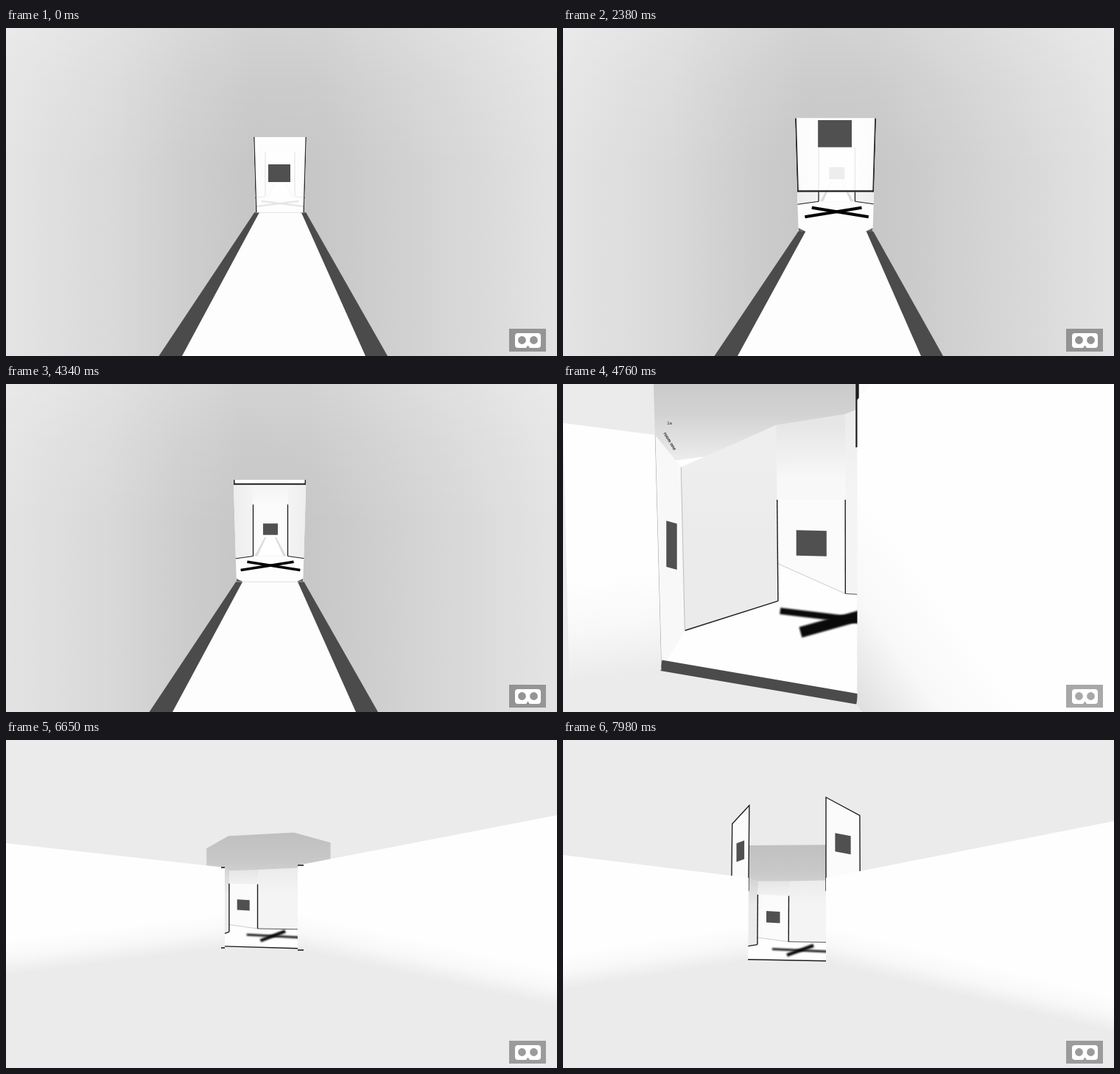
An HTML page with a canvas for the animation above (8 s loop, 748 px wide and 445 px high).

```html
<!DOCTYPE html>
<html lang="en">
<head>
<meta charset="utf-8">
<title>Rooms</title>
<style>
  html, body { margin: 0; width: 100%; height: 100%; overflow: hidden; background: #ebebeb; }
  canvas { display: block; }
</style>
</head>
<body>
<canvas id="stage" width="748" height="445"></canvas>
<script>
const W = 748, H = 445, LOOP = 8000, STEP = 70;
const HORIZON = 198, DROP = H - HORIZON;
const EXIT = 4690; // moment the camera passes through the corridor wall
const g = document.getElementById('stage').getContext('2d');
const DARK = '#4b4b4b', MARK = '#505050', INK = '#1c1c1c';

// ---------- helpers ----------
const lerp = (a, b, p) => a + (b - a) * p;
const clamp = v => Math.max(0, Math.min(1, v));
const grey = v => `rgb(${v},${v},${v})`;

// straight moves between [time, value] keys
function track(keys, t) {
  const i = keys.findIndex(k => t <= k[0]);
  if (i < 0) return keys[keys.length - 1][1];
  if (!i) return keys[0][1];
  const [t0, a] = keys[i - 1], [t1, b] = keys[i];
  return lerp(a, b, (t - t0) / (t1 - t0));
}

function trace(points) {
  g.beginPath();
  points.flat().forEach((v, i, all) => i % 2 && g.lineTo(all[i - 1], v));
  g.closePath();
}

function poly(points, fill) {
  trace(points);
  g.fillStyle = fill;
  g.fill();
}

function line([x1, y1], [x2, y2], w = 1, color = INK) {
  g.beginPath();
  g.moveTo(x1, y1);
  g.lineTo(x2, y2);
  g.lineWidth = w;
  g.strokeStyle = color;
  g.stroke();
}

function ramp(x1, y1, x2, y2, ...stops) {
  const r = g.createLinearGradient(x1, y1, x2, y2);
  stops.forEach(([at, c]) => r.addColorStop(at, c));
  return r;
}

function soft(px, draw) {
  g.save();
  g.filter = `blur(${px}px)`;
  draw();
  g.restore();
}

function mark([x, y], w, h, skew = 0) {
  const a = w / 2, b = h / 2;
  soft(.7, () => poly([x - a, y - b - skew, x + a, y - b + skew, x + a, y + b + skew, x - a, y + b - skew], MARK));
}

// ---------- corridor ----------
const DIST = [[420, 1], [1190, .29], [1260, .305], [1330, .48], [1890, 1], [1960, 1],
  [2380, .654], [2730, .48], [2800, .48], [3150, .73]];
const LIFT = [[770, 0], [1050, 1], [1610, 1], [1890, 0], [2240, 0], [2380, .365], [2600, 1]];
const TURN = [[3570, 0], [3780, -13]];
const STRAFE = [[420, 0], [700, 2], [3570, 2], [3780, 0], [4340, 0], [EXIT, 190]];

function tunnel(shift) {
  g.fillStyle = ramp(shift, 0, W + shift, 0, [0, '#e4e4e4'], [.2, '#d9d9d9'], [.34, '#cdcdcd'],
    [.45, '#c6c6c6'], [.57, '#c7c7c7'], [.68, '#cecece'], [.82, '#d7d7d7'], [1, '#e3e3e3']);
  g.fillRect(0, 0, W, H);
  g.fillStyle = ramp(0, 0, 0, 190, [0, 'rgba(255,255,255,.22)'], [.4, 'rgba(255,255,255,.1)'], [1, 'rgba(255,255,255,0)']);
  g.fillRect(0, 0, W, 190);
}

function hall(cx, s) {
  const half = 36.4 * s, up = 197 - 100 * s, top = 197 - 52 * s, low = 200 + 52 * s;
  const y = 199 + 14 * s;
  g.fillStyle = '#fdfdfd';
  g.fillRect(0, 0, W, H);
  poly([cx - half - 200, up - 68, cx + half + 200, up - 68, cx + half, up, cx - half, up], '#eeeeee');
  poly([cx - half, up, cx + half, up, cx + half, top, cx - half, top],
    ramp(0, up, 0, top, [0, '#f3f3f3'], [1, '#fafafa']));
  poly([cx - half, top, cx + half, top, cx + half, low, cx - half, low], '#fbfbfb');
  poly([cx - 12 * s, y, cx + 12 * s, y, cx + half - 2, low, cx - half + 2, low], '#dadada');
  poly([cx - 9 * s, y, cx + 9 * s, y, cx + half - 9 * s, low, cx - half + 9 * s, low], '#fff');
  for (const side of [-1, 1]) {
    const x = cx + side * half, far = x + side * 200;
    poly([x, up, far, up - 68, far, low + 28, x, low],
      ramp(x, 0, x + side * 50, 0, [0, '#f4f4f4'], [1, '#e7e7e7']));
    line([x, low], [far, low + 28]);
    line([x, top], [x, low], 1.3);
  }
  mark([cx, 197], 31 * s, 24 * s);
}

function floorCross(cx, s) {
  const y = 203 + 50 * s, dy = 7.2 * s * s;
  soft(.7, () => {
    for (const side of [-1, 1])
      line([cx + side * 46 * s, y + dy], [cx - side * 36 * s, y - dy], 4.6 * s * s, '#000');
  });
}

function door(cx, s, top, bottom, lift) {
  const rise = lift * 96 * s, low = bottom - rise, w = 1.4 * s;
  const at = y => lerp(36, 33, (y - top) / (bottom - top)) * s - .8;
  const a = at(top), b = at(low);
  poly([cx - a, top, cx + a, top, cx + b, low, cx - b, low], 'rgba(254,254,254,.9)');
  mark([cx - 1, 197 - rise], 30 * s, 24 * s);
  for (const side of [-1, 1]) line([cx + side * a, top], [cx + side * b, low], w, '#2b2b2b');
  if (lift) line([cx - b, low - w / 2], [cx + b, low - w / 2], w);
}

function corridor(t) {
  const dist = track(DIST, t), turn = track(TURN, t), k = track(STRAFE, t);
  const s = 1 / dist, mid = 1 / (dist + .41), far = 1 / (dist + .82);
  const slide = scale => k * 50 * scale / DROP;
  const top = 197 - 48.9 * s, bottom = 201.3 + 48.9 * s;
  const cx = 372 + turn - 2.5 * (s - 1) - slide(s);
  tunnel(turn - k * .6);

  const edge = (vp, spread, y) => vp + turn + (spread - k) * (y - HORIZON) / DROP;
  const strip = (left, right, fill) => poly([edge(372, left, bottom), bottom, edge(377.5, right, bottom), bottom,
    edge(377.5, right, H), H, edge(372, left, H), H], fill);
  strip(-164.5, 140.5, DARK);
  strip(-133, 110.5, '#fdfdfd');

  g.save();
  trace([cx - 36 * s, top, cx + 36 * s, top, cx + 33 * s, bottom, cx - 33 * s, bottom]);
  g.clip();
  hall(372 + turn - slide(far), far);
  floorCross(372 + turn - slide(mid), mid);
  if (s > 1.1) {
    for (const side of [-1, 1]) {
      const x = cx + side * 33 * s;
      poly([x, bottom - 3.2 * s, x - side * 6.4 * s, bottom, x, bottom], '#666');
    }
  }
  door(cx, s, top, bottom, track(LIFT, t));
  g.restore();
}

// ---------- outside ----------
// gap: corners of the open front, clockwise from top left
// slope: left wall top and foot, right wall top and foot
// panel: left, right, top, floor corner, left and right base, as shares of the gap
// bits: visible side panel, ceiling overhang, lift of the left and right door
const CLOSE = {
  gap: [166, 118, 357, 85, 357, 373, 172, 340], slope: [.127, -.128, -1.165, 1.358],
  panel: [.6, .94, .31, .675, .54, .637], cross: [.97, .72], bits: [.125, 0, 0, .3]
};
const AFAR = {
  gap: [297, 173, 396, 170, 396, 285, 297, 282], slope: [.111, -.125, -.193, .219],
  panel: [.06, .45, .2, .8, .71, .755], cross: [.66, .84], bits: [0, .25, 0, 0]
};
const MIDWAY = {
  gap: [252, 187, 357, 187, 357, 302, 251, 300], slope: [.123, -.155, -.197, .246],
  panel: [.12, .52, .2, .8, .715, .76], cross: [.67, .86], bits: [0, 0, .87, .95]
};

const zoom = (pose, k, cx, cy) =>
  ({ ...pose, gap: pose.gap.map((v, i) => lerp(i % 2 ? cy : cx, v, k)) });

function mix(a, b, p) {
  const out = {};
  for (const key in a) out[key] = a[key].map((v, i) => lerp(v, b[key][i], p));
  return out;
}

const NEARER = zoom(CLOSE, 1.15, 260, 230);
const MOVES = [
  [EXIT, 5040, zoom(CLOSE, 1.6, 260, 230), NEARER, u => u * (2 - u)],
  [5320, 5600, NEARER, CLOSE, u => u],
  [5600, 6650, CLOSE, AFAR, u => 1 - (1 - u) ** 2.6],
  [6650, 7770, AFAR, zoom(MIDWAY, 1.65, 310, 222), u => u * u],
  [7770, LOOP - 20, zoom(MIDWAY, 1.65, 310, 222), MIDWAY, u => u]
];

function poseAt(t) {
  const [t0, t1, a, b, ease] = MOVES.find(m => t <= m[1]);
  return mix(a, b, ease(clamp((t - t0) / (t1 - t0))));
}

// white wall running off stage, fading to grey along its foot
function outerWall(top, foot, slopeTop, slopeFoot, side, tone) {
  const run = (side > 0 ? W : 0) - top[0];
  const d = (foot[1] - top[1]) * .42 / Math.hypot(1, slopeFoot);
  poly([top, top[0] + run, top[1] + run * slopeTop, foot[0] + run, foot[1] + run * slopeFoot, foot],
    ramp(...foot, foot[0] + slopeFoot * d, foot[1] - d, [0, grey(tone)], [.5, '#f8f8f8'], [1, '#fefefe']));
}

function raisedDoor(at, side, lift, h, gapW) {
  const u = side < 0 ? 0 : 1, wide = side < 0 ? .22 : .44;
  const quad = [at(u, -lift), at(u + side * wide, .22 - lift), at(u + side * wide, .15), at(u, .15)];
  poly(quad, '#fbfbfb');
  g.lineWidth = h * .012;
  g.strokeStyle = INK;
  trace(quad);
  g.stroke();
  mark(at(u + side * wide / 2, .55 - lift), gapW * wide * .46, h * .22, side * 2);
}

function sign([x, y], alpha) {
  g.save();
  g.globalAlpha = alpha;
  g.fillStyle = '#222';
  g.translate(x, y);
  g.font = '6px "Liberation Sans", sans-serif';
  g.fillText('1a', 5, -12);
  g.rotate(1.02);
  g.font = 'bold 6px "Liberation Sans", sans-serif';
  g.fillText('room one', 0, 0);
  g.restore();
}

function room(at, pose, h, gapW) {
  const [u0, u1, top, corner, baseL, baseR] = pose.panel;
  const [side, over] = pose.bits;
  const [cu, cv] = pose.cross;
  const low = Math.round(211 + 216 * side), ceilTop = at(0, -.4)[1];
  const shade = (quad, a, b) =>
    poly(quad, ramp(0, quad[0][1], 0, lerp(quad[0][1], quad[3][1], .4), [0, a], [1, b]));

  poly([at(0, 0), at(1, 0), at(1, .98), at(0, .98)], '#fefefe');
  poly([at(-over, -.4 + over * .6), at(over * .2, -.39), at(1 - over * .2, -.39),
    at(1 + over * 1.8, -.4 + over * .6), at(1 + over * 1.8, -.05), at(1, .12), at(0, .12), at(-over, 0)],
    ramp(0, ceilTop, 0, at(0, .12)[1], [0, grey(192)], [.6, grey(Math.round(lerp(192, low, .4)))], [1, grey(low)]));

  const backL = at(u0, .04), backR = at(u1, .04);
  const innerTop = at(side, side * 1.2), innerLow = at(side, .82), cornerL = at(u0, corner);
  const footL = at(u0, baseL), footR = at(u1, baseR), right = at(1, baseR);
  const panelL = at(u0, top), panelR = at(u1, top + .015);
  shade([backL, backR, footR, footL], '#e6e6e6', '#f8f8f8');
  shade([backR, at(1, .03), right, footR], '#ececec', '#f4f4f4');
  shade([innerTop, backL, cornerL, innerLow], grey(low), '#ebebeb');
  poly([panelL, panelR, footR, footL], '#fbfbfb');
  line(innerLow, cornerL, 1.4);
  line(footR, right, 1, '#555');
  line(footL, footR, 1, '#ccc');
  line(panelL, cornerL, 1.4);
  line(panelR, footR, 1.4);
  const logoW = (u1 - u0) * gapW * .44;
  mark(at((u0 + u1) / 2, (top + (baseL + baseR) / 2) / 2 + side * .15), logoW, logoW * .84, .5);

  if (side > .005) {
    poly([at(0, 0), innerTop, innerLow, at(0, 1)], '#f8f8f8');
    line(at(0, 0), at(0, 1), 1, '#999');
    line(innerTop, innerLow, 1, '#bbb');
    mark(at(side * .55, .47), side * gapW * .42, h * .17, 2);
    sign(at(side * .33, 0), clamp(side * 10 - .2));
  }

  const short = .17 + .7 * side;
  soft(.8, () => {
    line(at(cu - short, cv + .06), at(cu + short, cv - .06), h * .04, '#0a0a0a');
    line(at(cu - .36, cv - .01), at(cu + .36, cv + .01), h * .024, '#0a0a0a');
  });
  const sill = 1.2 * (h / 105) ** 2;
  line(at(0, .98), at(1, .98), sill, sill > 3 ? DARK : INK);
}

function outside(t) {
  const pose = poseAt(t);
  const [x0, y0, x1, y1, x2, y2, x3, y3] = pose.gap;
  const [lt, lf, rt, rf] = pose.slope;
  const [side, over, liftL, liftR] = pose.bits;
  const h = (y3 - y0 + y2 - y1) / 2, gapW = x1 - x0;
  const at = (u, v) => [lerp(lerp(x0, x1, u), lerp(x3, x2, u), v), lerp(lerp(y0, y1, u), lerp(y3, y2, u), v)];
  g.fillStyle = '#ebebeb';
  g.fillRect(0, 0, W, H);
  room(at, pose, h, gapW);
  if (liftL > .02) raisedDoor(at, -1, liftL, h, gapW);
  if (liftR > .02) raisedDoor(at, 1, liftR, h, gapW);
  outerWall([x0, y0], [x3, y3], lt, lf, -1, 235);
  outerWall([x1, y1], [x2, y2], rt, rf, 1, Math.round(235 - 100 * side));
  if (over > .1) {
    for (const u of [0, 1]) {
      for (const v of [0, 1]) {
        const [x, y] = at(u, v);
        line([x, y], [x + (u ? 8 : -5), y], 1.6);
      }
    }
  }
}

// ---------- headset button ----------
function button() {
  g.fillStyle = 'rgba(0,0,0,.34)';
  g.fillRect(683, 408, 50, 31);
  g.fillStyle = '#fff';
  g.beginPath();
  g.roundRect(691, 414, 35, 20, 4);
  for (const x of [700.5, 716.5]) {
    g.moveTo(x + 5.4, 423.5);
    g.arc(x, 423.5, 5.4, 0, 7);
  }
  g.moveTo(706, 434);
  g.lineTo(708.5, 430.5);
  g.lineTo(711, 434);
  g.closePath();
  g.fill('evenodd');
}

function frame(now) {
  const t = Math.floor(now % LOOP / STEP) * STEP;
  if (t < EXIT) corridor(t);
  else outside(t);
  button();
  requestAnimationFrame(frame);
}
frame(0);
</script>
</body>
</html>
```
